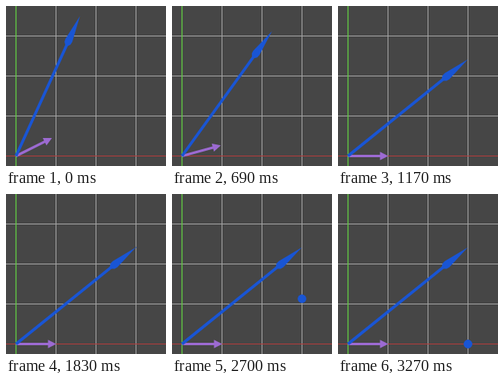
Animation, 200 px wide and 200 px high, one loop 3.6 s. Source, as an HTML page:

```html
<!DOCTYPE html>
<html lang="en">
<head>
<meta charset="utf-8">
<title>Rotating a vector onto the axis</title>
<style>
  html, body { margin: 0; height: 100%; overflow: hidden; background: #464646; }
  svg { display: block; width: 100vw; height: 100vh; }
</style>
</head>
<body>
<svg viewBox="0 0 200 200">
  <path d="M62.5 0V200M112.5 0V200M162.5 0V200M0 37.5H200M0 87.5H200M0 137.5H200" stroke="#a2a2a2"/>
  <path d="M0 187.5H200" stroke="#b03c3c" stroke-width="1.2"/>
  <path d="M12.5 0V200" stroke="#62c844" stroke-width="1.3"/>
  <g transform="translate(12.5 187.5)">
    <g id="unit" fill="#9c6ad2">
      <path d="M0 -1.6H40V-5.2L50.3 0L40 5.2V1.6H0Z"/>
    </g>
    <g id="vector" fill="#1955d4">
      <path d="M0 -1.8H152L155 -4.2L159 -4.7L192.4 0L159 4.7L155 4.2L152 1.8H0Z"/>
    </g>
    <circle id="dot" cx="150" fill="#1955d4"/>
  </g>
</svg>
<script>
  const LOOP = 3600, STEP = 30, DOT_RADIUS = 5.4;
  const UNIT_ANGLE = Math.atan2(1, 2) * 180 / Math.PI;
  const VECTOR_ANGLE = Math.atan2(3.5, 1.6) * 180 / Math.PI;
  const DOT_START = -120.7;

  const [unit, vector, dot] = ["unit", "vector", "dot"].map(id => document.getElementById(id));
  const progress = (t, start, end) => Math.min(1, Math.max(0, (t - start) / (end - start)));
  const ease = u => u * u * (3 - 2 * u);

  function draw(now) {
    const t = Math.floor(now % LOOP / STEP) * STEP;
    const turn = UNIT_ANGLE * ease(progress(t, 300, 1170));
    unit.setAttribute("transform", `rotate(${turn - UNIT_ANGLE})`);
    vector.setAttribute("transform", `rotate(${turn - VECTOR_ANGLE})`);
    dot.setAttribute("r", DOT_RADIUS * progress(t, 1800, 2080));
    dot.setAttribute("cy", DOT_START * (1 - ease(progress(t, 2080, 3270))));
  }

  const origin = performance.now();
  function tick() {
    draw(performance.now() - origin);
    requestAnimationFrame(tick);
  }
  tick();
</script>
</body>
</html>
```
